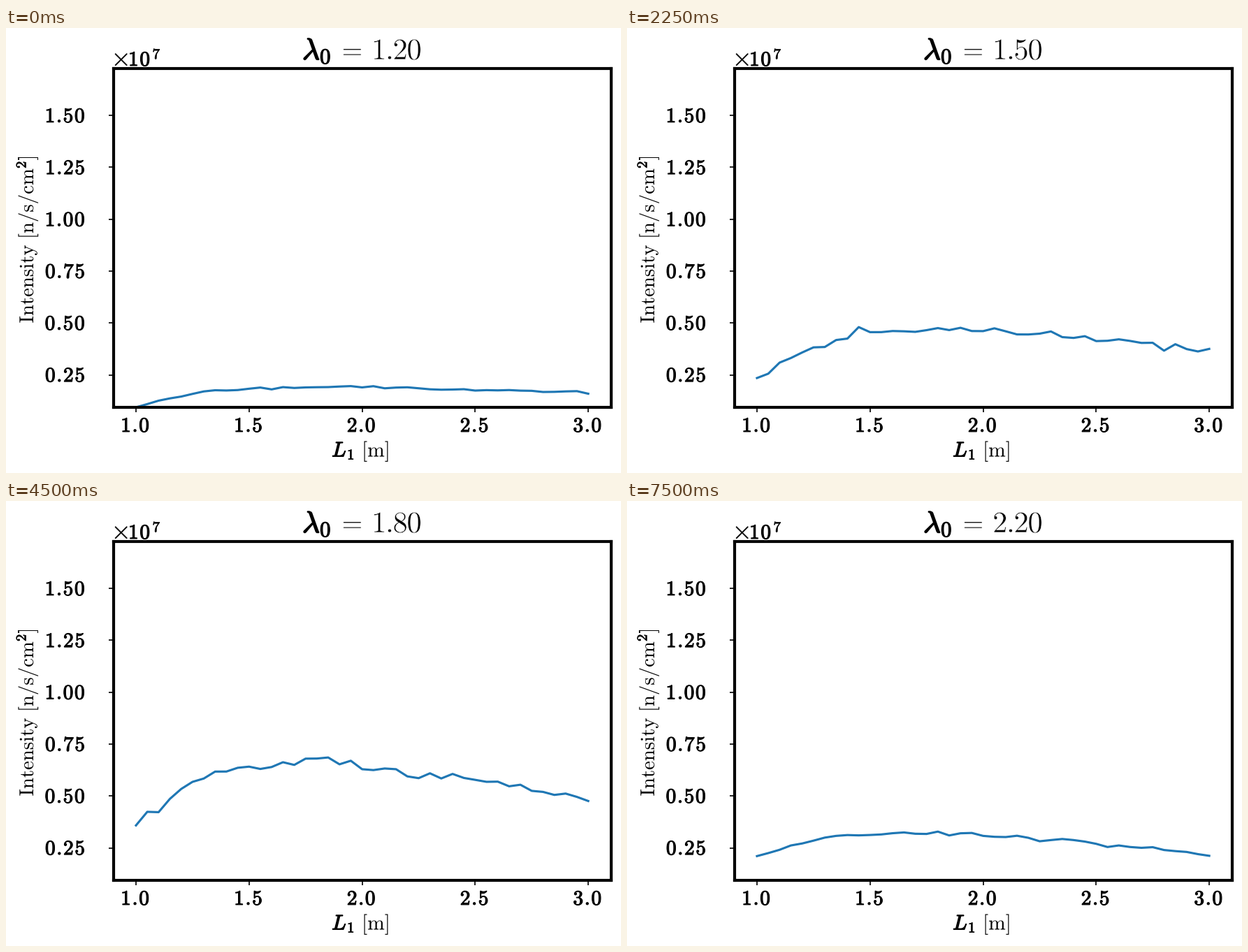
A matplotlib script that plays this animation: 880x637 px, repeating every 8 s.

```python
import numpy as np
import matplotlib.pyplot as plt
from matplotlib.animation import FuncAnimation
from matplotlib.patheffects import Normal, Stroke

W, H, DPI = 880, 637, 100
PT = 72 / DPI  # points per pixel
LEFT, RIGHT, TOP, BOTTOM = 153.6, 865.5, 57.5, 543
YMIN, YMAX = 9.35, 172.8

plt.rcParams["mathtext.fontset"] = "cm"

# Intensities are in units of 1e5 n/s/cm^2.
LENGTHS = np.linspace(1, 3, 41)
PEAKS = [19.3, 30, 39.5, 47, 51, 87.5, 66, 41, 27.3, 30.8, 32.6]


def curve(step):
    """Steep rise to a broad maximum at 1.8 m, slow fall, counting noise."""
    start = 0.485 + 0.0016 * step ** 2
    end = 0.85 - 0.019 * step
    rise = np.clip((1.8 - LENGTHS) / 0.8, 0, 1) ** 2.7
    fall = np.clip((LENGTHS - 1.8) / 1.2, 0, 1) ** 1.3
    shape = 1 - (1 - start) * rise - (1 - end) * fall
    noise = np.random.default_rng(step).normal(0, 0.024, LENGTHS.size)
    noise[0] = 0
    return PEAKS[step] * shape * (1 + noise)


def number(s, font, gap):
    """Mathtext number with letter spacing; a lone dot brings 0.2 of its own."""
    out = s[0]
    for a, b in zip(s, s[1:]):
        space = gap - 0.2 if a == "." else gap
        out += rf"\hspace{{{space:.3f}}}{b}"
    return rf"$\{font}{{{out}}}$"


def title_value(step):
    return number(f"{1.2 + 0.1 * step:.2f}", "mathrm", -0.04)


def label(x, y, s, size, stroke=0, **kw):
    """Text with its baseline at stage pixel (x, y); stroke < 0 thins it."""
    effects = [Normal()]
    if stroke:
        edge = "black" if stroke > 0 else "white"
        effects = [Stroke(linewidth=abs(stroke) * PT, foreground=edge)]
    return fig.text(x / W, 1 - y / H, s, fontsize=size * PT, va="baseline",
                    color="black", path_effects=effects, **kw)


def bold(x, y, s, size=29.5, **kw):
    return label(x, y, number(s, "mathbf", 0.06), size, size / 27, **kw)


fig = plt.figure(figsize=(W / DPI, H / DPI), dpi=DPI, facecolor="white")
ax = fig.add_axes([LEFT / W, 1 - BOTTOM / H,
                   (RIGHT - LEFT) / W, (BOTTOM - TOP) / H])
ax.set_xlim(0.9, 3.1)
ax.set_ylim(YMIN, YMAX)
ax.set_xticks([1, 1.5, 2, 2.5, 3])
ax.set_yticks(range(25, 151, 25))
ax.tick_params(length=7.3 * PT, width=1.67 * PT,
               labelbottom=False, labelleft=False)
for spine in ax.spines.values():
    spine.set_linewidth(4.17 * PT)

# Tick labels
for v in ax.get_xticks():
    x = LEFT + (v - 0.9) / 2.2 * (RIGHT - LEFT)
    bold(x - 1, 578, f"{v:.1f}", ha="center")
for v in ax.get_yticks():
    y = BOTTOM - (v - YMIN) / (YMAX - YMIN) * (BOTTOM - TOP)
    bold(113.5, y + 9.7, f"{v / 100:.2f}", ha="right")

# Axis multiplier
label(163, 54.5, r"$\times$", 36, 0.4, ha="center")
bold(175, 54, "10")
bold(209.5, 44, "7", 21)

# Axis names
upright = dict(rotation=90, rotation_mode="anchor", ha="left")
label(39, 422.5, r"$\mathrm{Intensity\ [n/s/cm}$", 28.8, **upright)
bold(28.5, 201, "2", 20.5, **upright)
label(39, 189.5, r"$\mathrm{]}$", 28.8, **upright)
label(466.2, 613.5, "$L$", 30, 1.3)
bold(488, 617.5, "1", 21)
label(509, 613.5, r"$\mathrm{[m]}$", 29.5)

# Title
label(424, 45, r"$\lambda$", 43, 1.7)
bold(449, 51, "0", 31)
label(492, 44, "$=$", 38, -0.3, ha="center")
value = label(523, 45, title_value(0), 43, -0.5)

line, = ax.plot(LENGTHS, curve(0), color="#1f77b4", lw=3.13 * PT)


def update(i):
    step = i // 3  # each wavelength holds for 750 ms
    line.set_ydata(curve(step))
    value.set_text(title_value(step))
    return line, value


anim = FuncAnimation(fig, update, frames=32, interval=250,
                     repeat=True, repeat_delay=0, blit=False)
plt.show()
```
